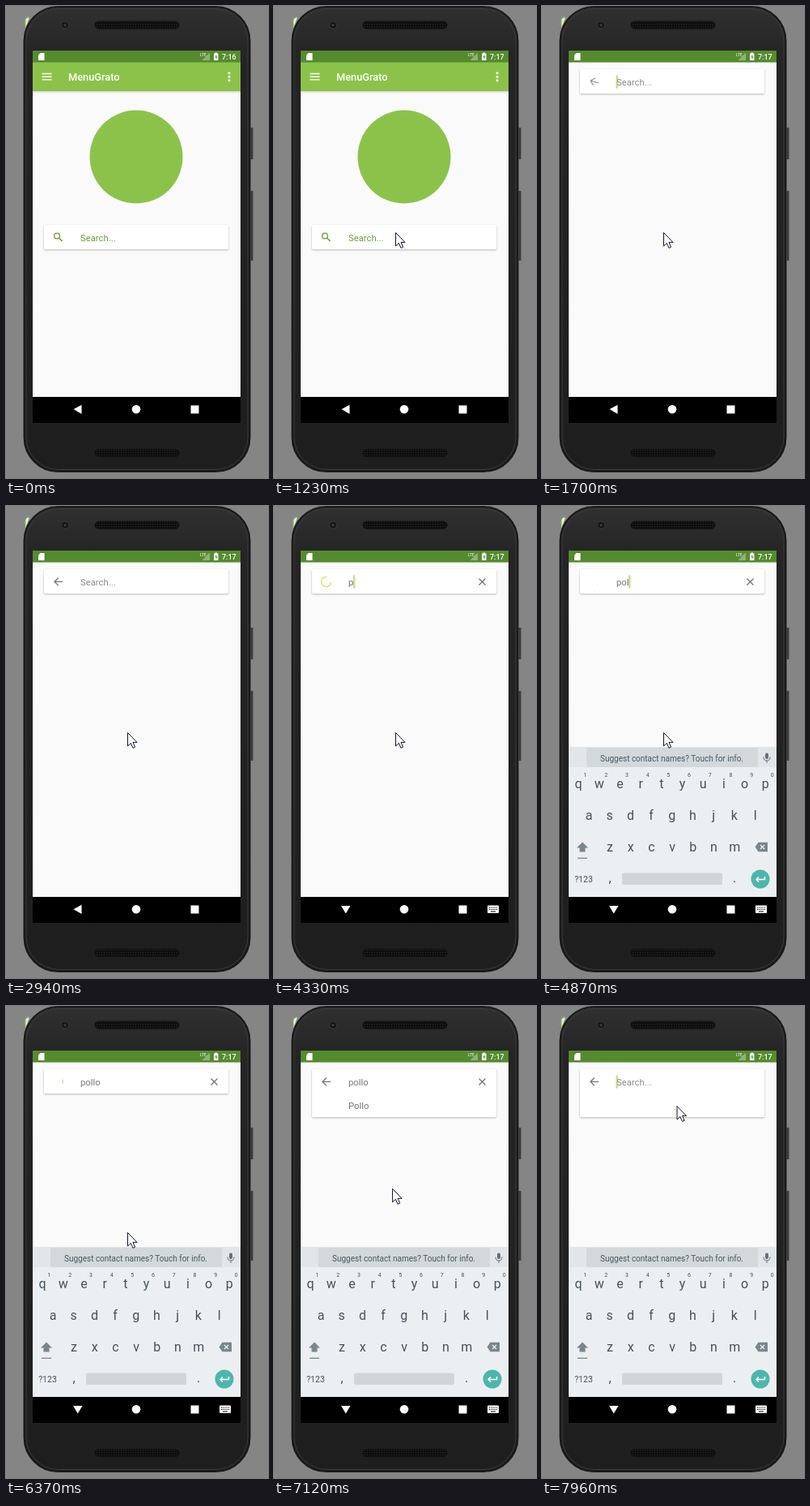
These frames come from a looping animation (324 px wide and 582 px high, 8 s). An HTML page:

```html
<!DOCTYPE html>
<html lang="es">
<head>
<meta charset="utf-8">
<title>Search demo</title>
<style>
  html, body { margin: 0; width: 100%; height: 100%; overflow: hidden; background: #858585; }
  svg { display: block; width: 100%; height: 100%; }
  text { font-family: Roboto, sans-serif; }
  .line { fill: none; stroke-width: 1.3; }
  #card rect { filter: drop-shadow(0 1px 1px #0004); }
  #keys { font-size: 16px; fill: #45525a; text-anchor: middle; }
</style>
</head>
<body>
<svg viewBox="0 0 324 582">
  <defs>
    <linearGradient id="body" x2="0" y2="1">
      <stop stop-color="#303030"/><stop offset=".1" stop-color="#252525"/><stop offset="1" stop-color="#1e1e1e"/>
    </linearGradient>
    <linearGradient id="shade" x2="0" y2="1">
      <stop stop-color="#0003"/><stop offset="1" stop-color="#0000"/>
    </linearGradient>
    <pattern id="mesh" width="3" height="3" patternUnits="userSpaceOnUse">
      <rect width="3" height="3" fill="#0c0c0c"/><circle cx="1.5" cy="1.5" r=".8" fill="#292929"/>
    </pattern>
    <clipPath id="screen"><rect x="33" y="55" width="257" height="427"/></clipPath>
  </defs>

  <!-- phone -->
  <rect width="324" height="582" fill="#858585"/>
  <path d="M24 27V18Q24 14 29 14" fill="#e8f3dc" stroke="#8bc34a"/>
  <path d="M304 150V189M304 228V314" stroke="#3c3c3c" stroke-width="3"/>
  <rect x="22.5" y="1" width="279" height="573" rx="42" fill="url(#body)" stroke="#191919" stroke-width="2"/>
  <rect x="25" y="3.5" width="274" height="568" rx="40" fill="none" stroke="#3b3b3b"/>
  <circle cx="73" cy="23.5" r="4.5" fill="#151515" stroke="#3c3c3c"/>
  <circle cx="73" cy="23.5" r="1.6" fill="#38424c"/>
  <rect x="110" y="19" width="104" height="9" rx="4.5" fill="url(#mesh)" stroke="#101010"/>
  <rect x="110" y="546.5" width="104" height="9" rx="4.5" fill="url(#mesh)" stroke="#101010"/>
  <rect x="33" y="55" width="257" height="459" fill="#fafafa"/>

  <g clip-path="url(#screen)">
    <g id="home">
      <rect x="33" y="104" width="257" height="4" fill="url(#shade)"/>
      <rect x="33" y="69" width="257" height="36" fill="#8bc34a"/>
      <path d="M44.5 83.5h12m-12 3.7h12m-12 3.7h12" stroke="#fff" stroke-width="1.4"/>
      <text x="77" y="92" font-size="12.8" font-weight="500" fill="#fff">MenuGrato</text>
      <g fill="#fff"><circle cx="276" cy="82.7" r="1.5"/><circle cx="276" cy="87.2" r="1.5"/><circle cx="276" cy="91.7" r="1.5"/></g>
      <circle cx="161" cy="186" r="57.5" fill="#8bc34a"/>
    </g>
    <g id="card">
      <rect id="panel" x="47" y="78" width="228" height="30" rx="1.5" fill="#fff"/>
      <text id="result" x="92" y="126.8" font-size="11.3" fill="#757575">Pollo</text>
      <g id="lens" class="line" stroke="#689f38"><circle cx="63" cy="91.5" r="3.4"/><path d="M65.5 94l4 4" stroke-width="1.6"/></g>
      <path id="arrow" class="line" d="M70 93.3H60m4.8-4.8L60 93.3l4.8 4.8" stroke="#757575"/>
      <path id="spinner" class="line" stroke="#d3df62"/>
      <text id="query" x="92" y="97.5" font-size="11.3"></text>
      <rect id="caret" y="85.5" width="1.3" height="15.5" fill="#c5d84c"/>
      <path id="clear" class="line" d="M253.5 89.5l8 8m0-8l-8 8" stroke="#757575"/>
    </g>
    <g id="keyboard">
      <rect x="33" y="297" width="257" height="186" fill="#eceff1"/>
      <rect x="33" y="297" width="257" height="25" fill="#e2e6e8"/>
      <rect x="55" y="298" width="212" height="24" fill="#d3d8da"/>
      <text x="160.5" y="314.5" font-size="10" text-anchor="middle" fill="#455a64">Suggest contact names? Touch for info.</text>
      <rect x="276" y="304.5" width="4" height="7.5" rx="2" fill="#607078"/>
      <path d="M274 309.5q0 4.5 4 4.5t4-4.5M278 314v3" fill="none" stroke="#607078"/>
      <g id="keys"></g>
      <path d="M50 414.5l7 7h-3.5v5h-7v-5H43z" fill="#78868d"/>
      <path d="M44 434.3h12" stroke="#78868d" stroke-width="1.3"/>
      <path d="M263.5 420.5l4-5.7h11.5v11.4h-11.5z" fill="#78868d"/>
      <path d="M270 418l5 5m0-5l-5 5" stroke="#eceff1" stroke-width="1.3"/>
      <rect x="99" y="452.5" width="124" height="14.5" rx="2" fill="#d0d5d8"/>
      <circle cx="270" cy="460" r="11.5" fill="#4db6ac"/>
      <path d="M275.5 457v3.5H265m3-3l-3 3 3 3" fill="none" stroke="#fff" stroke-width="1.5"/>
    </g>
    <!-- status bar -->
    <rect x="33" y="55" width="257" height="14.5" fill="#558b2f"/>
    <path d="M42.5 58h5v9H40v-6.5z" fill="#fff"/>
    <path d="M252 57.5V67h-9.5z" fill="#8fb277"/>
    <text x="240" y="62" font-size="5" fill="#fff">LTE</text>
    <path d="M258.5 57.5h2.5v1h1.5V67H257v-8.5h1.5z" fill="#fff"/>
    <path d="M260.3 60l-2 3.3h1.4v2.4l2-3.3h-1.4z" fill="#558b2f"/>
    <text id="clock" x="267" y="66" font-size="9" font-weight="500" fill="#fff"></text>
  </g>

  <!-- navigation bar -->
  <rect x="33" y="482" width="257" height="32" fill="#000"/>
  <g fill="#fff">
    <path id="back"/>
    <circle cx="161" cy="497.3" r="5.3"/>
    <rect x="228.5" y="492.5" width="10" height="10"/>
    <g id="imeIcon">
      <rect x="264" y="492.5" width="14" height="9.5" rx="1"/>
      <path d="M266 495.2h10m-10 2.3h10" stroke="#000" stroke-dasharray="1.2 1"/>
      <path d="M268 500h6" stroke="#000"/>
    </g>
  </g>
  <path id="pointer" d="M.5.5V17l3.9-3.6 2.6 6 2.6-1.2-2.6-5.8h5z" fill="#fff" stroke="#10122c" stroke-linejoin="round"/>
</svg>

<script>
const LOOP = 8000, BLINK = 490;
const $ = id => document.getElementById(id);
const set = (id, attrs) => { for (const k in attrs) $(id).setAttribute(k, attrs[k]); };
const show = (id, opacity) => set(id, { opacity: +opacity });
const progress = (t, a, b) => Math.min(1, Math.max(0, (t - a) / (b - a)));
const smooth = p => p * p * (3 - 2 * p);
const easeOut = p => 1 - (1 - p) ** 3;

// [time, typed text]
const typing = [[1990, ''], [3870, 'p'], [4720, 'po'], [4790, 'pol'], [5120, 'poll'], [5420, 'pollo'], [7960, '']];

// [start, end, x, y]: pointer moves, each from the place before
const moves = [[540, 1230, 150, 279], [6700, 6810, 137, 270], [6900, 7500, 166.5, 123]];

function addKey(label, x, y, size = 16) {
  $('keys').insertAdjacentHTML('beforeend', `<text x="${x}" y="${y}" font-size="${size}">${label}</text>`);
}
[['qwertyuiop', 45], ['asdfghjkl', 58], ['zxcvbnm', 84]].forEach(([row, x], r) =>
  [...row].forEach((key, i) => {
    addKey(key, x + i * 25.7, 347.5 + r * 39.3);
    if (!r) addKey((i + 1) % 10, 53.5 + i * 25.7, 334, 7);
  }));
addKey('?123', 51.5, 464, 10.5);
addKey(',', 84, 464);
addKey('.', 238, 464);

function pointerAt(t) {
  let x = 205, y = 582;
  for (const [start, end, toX, toY] of moves) {
    const p = smooth(progress(t, start, end));
    x += (toX - x) * p;
    y += (toY - y) * p;
  }
  return [x, y];
}

// Indeterminate ring: the head runs ahead, then the tail catches up.
function ringPath(t) {
  const cycles = (t - 3667) / 1333, phase = cycles % 1;
  const base = 163 + (t - 4333) * 0.183 + (cycles - 0.5) * 90 + Math.floor(cycles) * 270 - 158;
  const head = base + 270 * easeOut(progress(phase, 0, 0.5)) + 3;
  const tail = base + 270 * easeOut(progress(phase, 0.5, 1));
  const point = a => [64.5 + 6 * Math.cos(a * Math.PI / 180), 93.3 + 6 * Math.sin(a * Math.PI / 180)];
  return `M${point(tail)}A6 6 0 ${+(head - tail > 180)} 1 ${point(head)}`;
}

function draw(t) {
  const rise = smooth(progress(t, 1540, 1690));
  const focused = t >= 1600, ime = t >= 3470, loading = t >= 3870 && t < 6500;
  const [typedAt, text] = typing.filter(([at]) => t >= at).pop() || [1990, ''];

  set('card', { transform: `translate(0 ${192 * (1 - rise)})` });
  show('home', 1 - progress(t, 1550, 1680));
  $('clock').textContent = t < 900 ? '7:16' : '7:17';

  $('query').textContent = text || 'Search...';
  set('query', { fill: !focused ? '#689f38' : text ? '#757575' : '#8a8a8a' });
  set('caret', { x: 92 + (text ? $('query').getComputedTextLength() : 0) });
  show('caret', t >= 1690 && (t < typedAt || Math.floor((t - typedAt) / BLINK) % 2 === 0));

  const turn = easeOut(progress(t, 1600, 1960));
  show('lens', !focused);
  show('arrow', focused && !loading ? 0.4 + 0.6 * turn : 0);
  set('arrow', { transform: `rotate(${45 * (1 - turn)} 64.5 93.3)` });
  show('spinner', loading);
  if (loading) set('spinner', { d: ringPath(t) });
  show('clear', t < 7960 ? progress(t, 4080, 4300) : 0);

  const open = easeOut(progress(t, 6480, 6590));
  set('panel', { height: 30 + 29 * open });
  show('result', t < 7960 ? progress(t, 6500, 6580) : 0);

  const up = progress(t, 4390, 4560);
  show('keyboard', up);
  set('keyboard', { transform: `translate(0 ${30 * (1 - easeOut(up))})` });
  show('imeIcon', ime);
  set('back', { d: ime ? 'M83 493h11.5l-5.75 9.5z' : 'M93.5 491.7v11.2l-10-5.6z' });

  set('pointer', { transform: `translate(${pointerAt(t)})` });
  show('pointer', t >= 540);
}

function tick() {
  draw(performance.now() % LOOP);
  requestAnimationFrame(tick);
}
tick();
</script>
</body>
</html>
```
